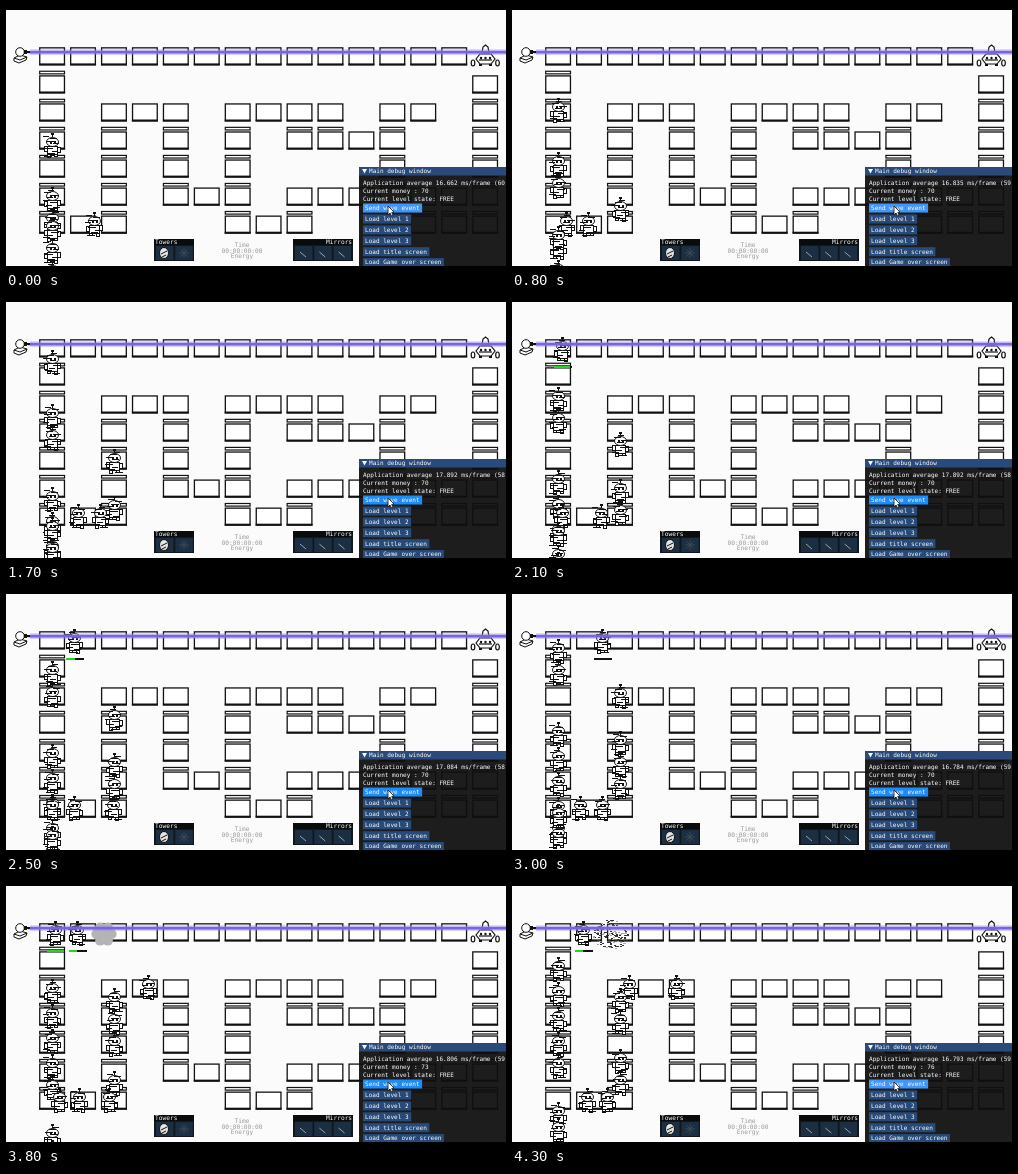
Recreate the animation shown at these times as an HTML page with a canvas. Size 500x264 px, loop 4.4 s.

```html
<!DOCTYPE html>
<html lang="en">
<head>
<meta charset="utf-8">
<title>Tower defence debug view</title>
<style>
html, body { margin: 0; width: 100%; height: 100%; overflow: hidden; background: #fbfbfb; }
canvas { display: block; width: 500px; height: 264px; }
</style>
</head>
<body>
<canvas id="stage" width="500" height="264"></canvas>
<script>
const ctx = document.getElementById('stage').getContext('2d');
const LOOP = 4400, STEP = 100, SPEED = 44;
const MONO = '"DejaVu Sans Mono", monospace';

// One character per cell, 31 x 28 px each
const MAP = [
  '##############.',
  '#.............#',
  '#.###.####.##.#',
  '#.#.#.#.####..#',
  '#.#.#.#....#..#',
  '#.#.###.#######',
  '###...###...###'
];

// Corner points of the two routes
const UPPER = [[46, 250], [46, 52], [479, 52]];
const LOWER = [[46, 250], [46, 219], [108, 219], [108, 106], [169, 106], [169, 190]];

// Distance along the route at time zero
const walkers = [
  ...[110, 56, 34, -27, -52, -77, -102, -124, -172].map(start => ({ route: UPPER, start })),
  ...[73, 26, 4, -18, -57, -79, -109, -129, -188].map(start => ({ route: LOWER, start }))
];
const HIT = 198, KILL = 243;

const AVERAGE = [[0, '16.662', 60], [500, '16.835', 59], [1400, '17.892', 58],
  [2200, '17.084', 58], [2800, '16.784', 59], [3500, '16.806', 59], [4100, '16.793', 59]];
const MONEY = [[0, 70], [3100, 73], [4300, 76]];

const at = (table, ms) => table.filter(row => row[0] <= ms).pop();

function box(x, y, w, h, fill) {
  ctx.fillStyle = fill;
  ctx.fillRect(x, y, w, h);
}

function frame(x, y, w, h, line = 1) {
  box(x, y, w, h, '#111');
  box(x + line, y + line, w - 2 * line, h - 2 * line, '#fff');
}

function text(str, x, y, size = 6.05, fill = '#fff', align = 'left') {
  ctx.font = `${size}px ${MONO}`;
  ctx.textAlign = align;
  ctx.textBaseline = 'middle';
  ctx.fillStyle = fill;
  ctx.fillText(str, x, y);
}

function shape(points, fill = '#fff') {
  ctx.beginPath();
  points.forEach(([x, y]) => ctx.lineTo(x, y));
  ctx.closePath();
  ctx.fillStyle = fill;
  ctx.fill();
  ctx.stroke();
}

function oval(x, y, rx, ry, fill, outline) {
  ctx.beginPath();
  ctx.ellipse(x, y, rx, ry, 0, 0, Math.PI * 2);
  ctx.fillStyle = fill;
  ctx.fill();
  if (outline) ctx.stroke();
}

const disc = (x, y, r, fill, outline) => oval(x, y, r, r, fill, outline);

function line(x1, y1, x2, y2) {
  ctx.beginPath();
  ctx.moveTo(x1, y1);
  ctx.lineTo(x2, y2);
  ctx.stroke();
}

function pen(color, width = 1) {
  ctx.strokeStyle = color;
  ctx.lineWidth = width;
}

function pointOn(route, dist) {
  for (let i = 1; i < route.length; i++) {
    const [ax, ay] = route[i - 1], [bx, by] = route[i];
    const len = Math.hypot(bx - ax, by - ay);
    if (dist <= len) {
      const k = dist / len;
      return [ax + (bx - ax) * k, ay + (by - ay) * k];
    }
    dist -= len;
  }
  return route[route.length - 1];
}

function drawMap() {
  MAP.forEach((cells, r) => [...cells].forEach((cell, c) => {
    if (cell !== '#') return;
    const x = 33.1 + c * 30.93, y = 41.2 + r * 28.05;
    if (r && MAP[r - 1][c] === '#') frame(x, y - 4.6, 26, 3.8, 1.2);
    frame(x, y, 26, 18.2, 1.3);
    box(x, y + 16.2, 26, 2, '#111');
  }));
}

function drawBeam() {
  box(24, 43.5, 476, 5.2, 'rgba(150,130,245,.55)');
  box(22, 45, 478, 2.4, '#7764e4');
}

function drawEmitter() {
  pen('#111');
  shape([[8, 52], [14, 49], [21, 51], [20, 54], [13, 57], [8, 55]]);
  line(8, 52, 14, 54);
  line(14, 54, 21, 51);
  disc(14, 46, 4.3, '#fff', true);
  box(18, 44, 3, 4, '#111');
  box(21, 45, 3, 2, '#111');
}

function drawBase() {
  pen('#111', 1.2);
  shape([[476, 47], [477, 41], [479.5, 39], [482, 41], [483, 47]]);
  shape([[470, 53], [474, 48], [485, 48], [489, 53], [485, 58], [474, 58]]);
  line(473, 54, 486, 54);
  for (const x of [475, 479.5, 484]) disc(x, 52, 1.2, '#111');
  for (const x of [467, 491.5]) oval(x, 57, 1.8, 3, '#fff', true);
  box(473, 58, 3, 2, '#111');
  box(483, 58, 3, 2, '#111');
}

function drawRobot(px, py, step) {
  const x = Math.round(px), y = Math.round(py), k = step % 2;
  pen('#111');
  line(x + .5, y - 12, x + .5, y - 8);
  box(x - 1, y - 13, 3, 2, '#111');
  // Legs and arms swap with each step
  frame(x - 5, y + 8, 4, 4 - k);
  frame(x + 2, y + 8, 4, 3 + k);
  frame(x - 8, y + k, 4, 6);
  frame(x + 5, y + 1 - k, 4, 6);
  frame(x - 5, y, 11, 9);
  oval(x + .5, y - 4, 6, 4.5, '#fff', true);
  box(x - 2, y - 5, 2, 3, '#111');
  box(x + 2, y - 5, 2, 3, '#111');
  // Flickering scan lines
  for (let i = 0; i < 9; i++) {
    const shift = (i * 7 + step * 5) % 11;
    box(x - 9 + shift, y - 10 + i * 2.5 | 0, 6 + i % 3, 1, '#111');
  }
}

function drawDebris(x, y) {
  let seed = 17;
  const rand = () => (seed = seed * 16807 % 2147483647) / 2147483647;
  for (let i = 0; i < 150; i++) {
    const a = rand() * Math.PI * 2, r = Math.sqrt(rand()) * 15;
    box(Math.round(x + Math.cos(a) * r * 1.2), Math.round(y + Math.sin(a) * r), 2, 1, i % 3 ? '#333' : '#aaa');
  }
}

function drawSmoke(x, y, age) {
  if (age > 1.35) return;
  if (age < .25 || age > .9) return drawDebris(x, y);
  const r = 7 + age * 4;
  disc(x, y, r, '#b4b4b4');
  for (let i = 0; i < 6; i++) {
    const a = i * Math.PI / 3;
    disc(x + Math.cos(a) * r * .75, y + Math.sin(a) * r * .75, r * .5, '#b4b4b4');
  }
}

function drawWalkers(sec, step) {
  walkers.forEach(({ route, start }, i) => {
    const dist = start + SPEED * sec;
    if (dist < -22) return;
    if (route === UPPER && dist > KILL) {
      const [x, y] = pointOn(route, KILL + 7);
      drawSmoke(x, y, (dist - KILL) / SPEED);
      return;
    }
    const [x, y] = dist < 0 ? [46, 250 - dist] : pointOn(route, dist);
    drawRobot(x, y, step + i);
    if (route === UPPER && dist > HIT) {
      const left = Math.max(0, 1 - (dist - HIT) / 44);
      const bx = Math.round(x - 8);
      box(bx, 68, 18, 2, '#111');
      box(bx, 68, Math.round(18 * left), 2, '#20d820');
    }
  });
}

function panel(title, x, w, tx, count) {
  box(x, 233, w, 22, '#10161c');
  box(x, 233, w, 6, '#090b0d');
  text(title, tx, 236.5, 6.2);
  for (let i = 0; i < count; i++) box(x + 2 + i * 19.3, 240, 17.5, 14, '#1c2f42');
}

function drawHud() {
  panel('Towers', 148, 40, 149, 2);
  panel('Mirrors', 287, 60, 320, 3);
  pen('#111');
  oval(158, 247, 4.5, 5.5, '#e4e4e4', true);
  line(155, 248, 161, 245);
  line(156, 251, 160, 249);
  pen('#3c4954');
  for (let i = 0; i < 4; i++) {
    const a = i * Math.PI / 4, dx = Math.cos(a) * 5, dy = Math.sin(a) * 5;
    line(178 - dx, 247 - dy, 178 + dx, 247 + dy);
  }
  pen('#9aa4ac');
  for (let i = 0; i < 3; i++) line(294 + i * 19.3, 246, 300 + i * 19.3, 251);
  ['Time', '00:00:00:00', 'Energy'].forEach((s, i) => text(s, 236, 239.5 + i * 5.5, 6.2, '#999', 'center'));
}

function button(label, y, fill) {
  box(357, y, label.length * 3.642 + 4.5, 9, fill);
  text(label, 359, y + 4.8);
}

function drawDebug(ms) {
  const [, avg, fps] = at(AVERAGE, ms);
  const pressed = ms >= 1400 && ms < 4200;
  box(353, 161, 147, 99, 'rgba(15,15,15,.94)');
  box(353, 161, 147, 8.5, '#294a7a');
  ctx.beginPath();
  ctx.moveTo(356, 163);
  ctx.lineTo(361, 163);
  ctx.lineTo(358.5, 167.5);
  ctx.fillStyle = '#fff';
  ctx.fill();
  text('Main debug window', 363, 165.5);
  text(`Application average ${avg} ms/frame (${fps}.0 FPS)`, 357, 177);
  text(`Current money : ${at(MONEY, ms)[1]}`, 357, 185);
  text('Current level state: FREE', 357, 193);
  button('Send wave event', 197.5, pressed ? '#1b8cfa' : '#4296fa');
  ['Load level 1', 'Load level 2', 'Load level 3', 'Load title screen', 'Load Game over screen']
    .forEach((label, i) => button(label, 208.5 + i * 10.9, '#274a78'));
}

function drawCursor() {
  pen('#111', .8);
  shape([[382, 200], [382, 209], [384, 207], [385.5, 210], [387, 209], [385.7, 206.5], [388, 206]]);
}

function draw(now) {
  const raw = Math.floor(now % LOOP / STEP) * STEP;
  const ms = raw < 200 ? 0 : raw;
  box(0, 0, 500, 264, '#fbfbfb');
  drawMap();
  drawBase();
  drawWalkers(ms / 1000, ms / STEP);
  drawBeam();
  drawEmitter();
  drawHud();
  drawDebug(ms);
  drawCursor();
  box(0, 0, 500, 4, '#000');
  box(0, 260, 500, 4, '#000');
}

function tick() {
  draw(performance.now());
  requestAnimationFrame(tick);
}
tick();
</script>
</body>
</html>
```
